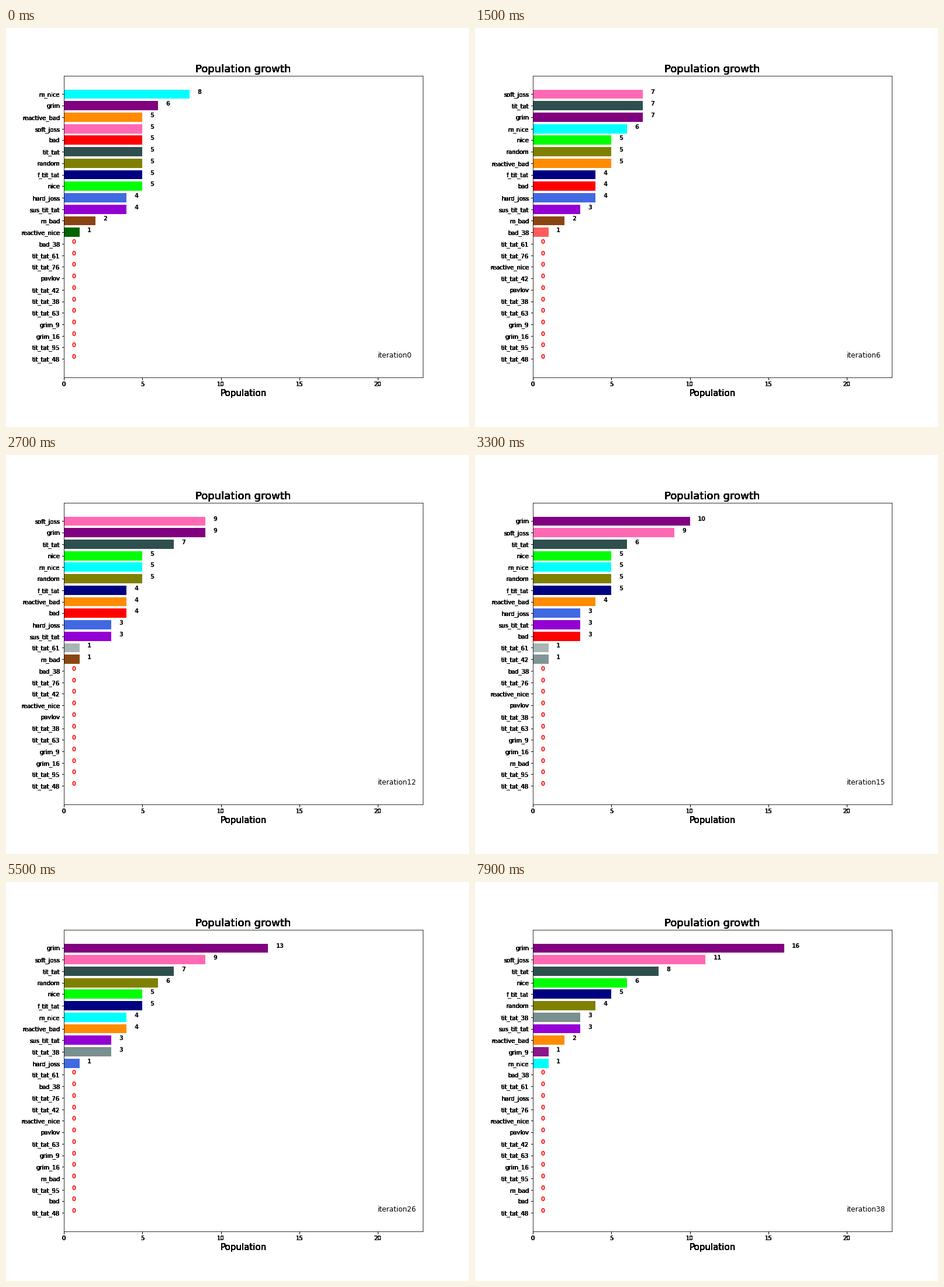
A matplotlib script that plays this animation: 792x684 px, repeating every 8 s.

```python
import numpy as np
import matplotlib.pyplot as plt
from matplotlib.animation import FuncAnimation
from matplotlib.colors import to_rgb

plt.rcParams["font.family"] = "DejaVu Sans"

STEP_MS = 100
FRAMES = 80
TOTAL = 60

BASE = {
    "m_nice": "cyan", "grim": "purple", "reactive_bad": "darkorange",
    "soft_joss": "hotpink", "bad": "red", "tit_tat": "darkslategray",
    "random": "olive", "f_tit_tat": "navy", "nice": "lime",
    "hard_joss": "royalblue", "sus_tit_tat": "darkviolet",
    "m_bad": "saddlebrown", "reactive_nice": "darkgreen", "pavlov": "gold",
}

# iteration: (ranking from the top, leading populations; the rest are zero)
KEYS = {
    0: ("m_nice grim reactive_bad soft_joss bad tit_tat random f_tit_tat nice "
        "hard_joss sus_tit_tat m_bad reactive_nice bad_38 tit_tat_61 "
        "tit_tat_76 pavlov tit_tat_42 tit_tat_38 tit_tat_63 grim_9 grim_16 "
        "tit_tat_95 tit_tat_48", "8 6 5 5 5 5 5 5 5 4 4 2 1"),
    3: ("nice soft_joss m_nice tit_tat grim random f_tit_tat reactive_bad "
        "hard_joss sus_tit_tat bad m_bad bad_38 tit_tat_61 tit_tat_42 "
        "tit_tat_76 reactive_nice pavlov tit_tat_38 tit_tat_63 grim_9 grim_16 "
        "tit_tat_95 tit_tat_48", "6 6 6 6 6 5 5 5 4 4 4 2 1"),
    9: ("soft_joss tit_tat grim nice m_nice random bad f_tit_tat hard_joss "
        "reactive_bad sus_tit_tat m_bad bad_38 tit_tat_61 tit_tat_76 "
        "reactive_nice pavlov tit_tat_42 tit_tat_38 tit_tat_63 grim_9 grim_16 "
        "tit_tat_95 tit_tat_48", "8 7 7 5 5 5 4 4 4 4 3 2 1 1"),
    15: ("grim soft_joss tit_tat nice m_nice random f_tit_tat reactive_bad "
         "hard_joss sus_tit_tat bad tit_tat_61 tit_tat_42 bad_38 tit_tat_76 "
         "reactive_nice pavlov tit_tat_38 tit_tat_63 grim_9 grim_16 m_bad "
         "tit_tat_95 tit_tat_48", "10 9 6 5 5 5 5 4 3 3 3 1 1"),
    22: ("grim soft_joss tit_tat random nice f_tit_tat m_nice reactive_bad "
         "sus_tit_tat tit_tat_38 hard_joss tit_tat_61 bad_38 tit_tat_42 "
         "tit_tat_76 reactive_nice pavlov tit_tat_63 grim_9 grim_16 m_bad "
         "tit_tat_95 bad tit_tat_48", "12 9 7 6 5 5 4 4 3 3 2"),
    31: ("grim soft_joss tit_tat random nice f_tit_tat m_nice sus_tit_tat "
         "reactive_bad tit_tat_38 bad_38 tit_tat_61 hard_joss tit_tat_76 "
         "reactive_nice pavlov tit_tat_42 tit_tat_63 grim_9 grim_16 m_bad "
         "tit_tat_95 bad tit_tat_48", "15 10 8 6 5 4 3 3 3 3"),
    38: ("grim soft_joss tit_tat nice f_tit_tat random tit_tat_38 sus_tit_tat "
         "reactive_bad grim_9 m_nice bad_38 tit_tat_61 hard_joss tit_tat_76 "
         "reactive_nice pavlov tit_tat_42 tit_tat_63 grim_16 tit_tat_95 m_bad "
         "bad tit_tat_48", "16 11 8 6 5 4 3 3 2 1 1"),
}

NAMES = KEYS[0][0].split()
COUNT = len(NAMES)
TIMES = list(KEYS)


def color_of(name):
    """Plain colour, or a paler shade of the parent for numbered offspring."""
    if name in BASE:
        return to_rgb(BASE[name])
    parent, number = name.rsplit("_", 1)
    k = int(number) / 105
    return tuple(c + (1 - c) * k for c in to_rgb(BASE[parent]))


def key_tables():
    ranks = np.zeros((len(KEYS), COUNT))
    pops = np.zeros((len(KEYS), COUNT))
    for row, (order, values) in enumerate(KEYS.values()):
        index = [NAMES.index(n) for n in order.split()]
        lead = [int(v) for v in values.split()]
        ranks[row, index] = np.arange(COUNT)
        pops[row, index[:len(lead)]] = lead
    return ranks, pops


RANKS, POPS = key_tables()
COLORS = [color_of(n) for n in NAMES]


def blend(table, it):
    return np.array([np.interp(it, TIMES, col) for col in table.T]).round(6)


def standings(it):
    """Indices from the bottom row up, and whole populations that sum to TOTAL."""
    exact = blend(POPS, it)
    pops = np.floor(exact).astype(int)
    spare = TOTAL - pops.sum()
    if spare > 0:
        pops[np.argsort(pops - exact, kind="stable")[:spare]] += 1
    order = np.lexsort((blend(RANKS, it), -pops))
    return order[::-1], pops


def harden(img, dpi):
    """Look of black text drawn many times over itself."""
    out = np.zeros_like(img)
    out[..., 3] = 1 - (1 - img[..., 3]) ** 10
    return out, 0, 0


fig, ax = plt.subplots(figsize=(11, 9.5), dpi=72, facecolor="white")
fig.subplots_adjust(left=0.125, right=0.9, bottom=0.125, top=0.88)
rows = np.arange(COUNT)
bars = ax.barh(rows, np.zeros(COUNT))
ax.set_xlim(0, 22.86)
ax.set_ylim(-1.59, COUNT + 0.59)
ax.set_xticks(range(0, 21, 5))
ax.set_yticks(rows)
ax.set_xlabel("Population", fontsize=15)
title = ax.set_title("Population growth", fontsize=18)
for artist in (ax.xaxis, ax.yaxis, title):
    artist.set_agg_filter(harden)

tags = [ax.text(0.5, y, "", fontsize=10, fontweight="bold") for y in rows]
counter = ax.text(20, 0.1, "", fontsize=12)


def update(frame):
    t = frame * STEP_MS
    it = 0 if t < 500 else (t - 500) // 200 + 1
    order, pops = standings(it)
    for bar, tag, i in zip(bars, tags, order):
        bar.set_width(pops[i])
        bar.set_facecolor(COLORS[i])
        tag.set_x(pops[i] + 0.5)
        tag.set_text(str(pops[i]))
        tag.set_color("black" if pops[i] else "red")
    ax.set_yticklabels([NAMES[i] for i in order])
    counter.set_text(f"iteration{it}")
    return []


anim = FuncAnimation(fig, update, frames=FRAMES, init_func=lambda: update(0),
                     interval=STEP_MS, repeat=True, repeat_delay=0, blit=False)
plt.show()
```
